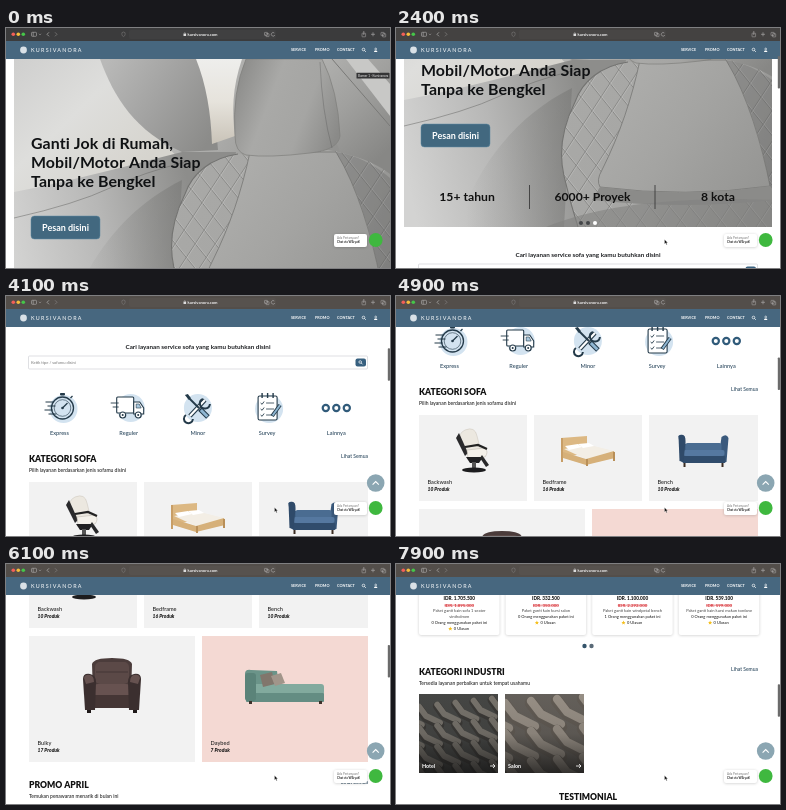
An HTML page with a canvas for the animation above (8 s loop, 384x240 px).

```html
<!DOCTYPE html>
<html lang="id">
<head>
<meta charset="utf-8">
<title>Kursivanora</title>
<style>
html, body { margin: 0; width: 100%; height: 100%; overflow: hidden; background: #fff; }
canvas { display: block; width: 384px; height: 240px; }
</style>
</head>
<body>
<canvas id="stage"></canvas>
<script>
const W = 384, H = 240, LOOP = 8000, STEP = 100;
const cv = document.getElementById('stage');
const dpr = Math.max(1, window.devicePixelRatio || 1);
cv.width = W * dpr;
cv.height = H * dpr;
const g = cv.getContext('2d');
const BLUE = '#47677f', INK = '#1b1d20', NAVY = '#29465c', LINE = '#243a49';

// ---- drawing helpers ----
function rect(x, y, w, h, fill, r = 0) {
  g.beginPath();
  g.roundRect(x, y, w, h, r);
  g.fillStyle = fill;
  g.fill();
}
function frame(x, y, w, h, color, lw = 0.6, r = 0) {
  g.beginPath();
  g.roundRect(x, y, w, h, r);
  g.strokeStyle = color;
  g.lineWidth = lw;
  g.stroke();
}
function disc(x, y, r, fill) {
  g.beginPath();
  g.arc(x, y, r, 0, 7);
  g.fillStyle = fill;
  g.fill();
}
function ring(x, y, r, color, lw) {
  g.beginPath();
  g.arc(x, y, r, 0, 7);
  g.strokeStyle = color;
  g.lineWidth = lw;
  g.stroke();
}
function line(color, lw, ...p) {
  g.beginPath();
  for (let i = 0; i < p.length; i += 2) g.lineTo(p[i], p[i + 1]);
  g.strokeStyle = color;
  g.lineWidth = lw;
  g.stroke();
}
function poly(fill, ...p) {
  g.beginPath();
  for (let i = 0; i < p.length; i += 2) g.lineTo(p[i], p[i + 1]);
  g.closePath();
  g.fillStyle = fill;
  g.fill();
}
function shape(d, fill, stroke, lw = 1) {
  const p = new Path2D(d);
  if (fill) { g.fillStyle = fill; g.fill(p); }
  if (stroke) { g.strokeStyle = stroke; g.lineWidth = lw; g.stroke(p); }
  return p;
}
function fade(x0, y0, x1, y1, ...stops) {
  const f = g.createLinearGradient(x0, y0, x1, y1);
  stops.forEach((c, i) => f.addColorStop(i / (stops.length - 1), c));
  return f;
}
function shadow(color, blur, dy = 0) {
  g.shadowColor = color;
  g.shadowBlur = blur * dpr;
  g.shadowOffsetY = dy * dpr;
}
function noShadow() { shadow('transparent', 0); }

// y is the middle of the capitals
function text(s, x, y, size, color = INK, style = '400', align = 'left', gap = 0) {
  g.font = `${style} ${size}px Lato, "Open Sans", sans-serif`;
  g.textAlign = align;
  g.letterSpacing = gap + 'px';
  g.fillStyle = color;
  g.fillText(s, x, y + size * 0.36);
}
function glass(x, y, color, r = 1.3) {
  ring(x, y, r, color, 0.7);
  line(color, 0.8, x + r * 0.7, y + r * 0.7, x + r * 1.8, y + r * 1.8);
}
function at(x, y, draw) {
  g.save();
  g.translate(x, y);
  draw();
  g.restore();
}

// ---- motion ----
const KEYS = [[0, 0], [1200, 0], [2400, 92], [4100, 268], [4900, 335], [6100, 476], [7100, 692], [7900, 761]];
const slope = i => (KEYS[i + 1][1] - KEYS[i][1]) / (KEYS[i + 1][0] - KEYS[i][0]);
function tangent(i) {
  if (i === 0) return 0;
  if (i === KEYS.length - 1) return slope(i - 1) * 0.6;
  const a = slope(i - 1), b = slope(i);
  return a * b <= 0 ? 0 : 2 * a * b / (a + b);
}
function scrollAt(t) {
  let i = 0;
  while (i < KEYS.length - 2 && t > KEYS[i + 1][0]) i++;
  const [t0, y0] = KEYS[i], [t1, y1] = KEYS[i + 1], d = t1 - t0;
  const u = Math.min(1, (t - t0) / d), v = 1 - u;
  return y0 * (1 + 2 * u) * v * v + tangent(i) * d * u * v * v
    + y1 * u * u * (3 - 2 * u) - tangent(i + 1) * d * u * u * v;
}
function intro(t) {
  const u = Math.min(1, Math.max(0, (t - 700) / 600));
  return u * u * (3 - 2 * u);
}

// ---- hero ----
function quilt(path, gap) {
  g.save();
  g.clip(path);
  for (let k = -300; k < 700; k += gap) {
    for (const [dx, c] of [[0, 'rgba(90,90,88,.5)'], [1, 'rgba(215,215,213,.4)']]) {
      line(c, 0.8, k + dx, 291, k + dx + 170, 31);
      line(c, 0.8, k + dx, 31, k + dx + 210, 291);
    }
  }
  g.restore();
}
function seatPhoto(right) {
  g.save();
  g.beginPath();
  g.rect(8, 31, right - 8, 260);
  g.clip();
  rect(8, 31, 376, 260, fade(8, 31, 384, 240, '#d9d9d8', '#c2c2c0', '#959593', '#8a8a88'));
  // windows and pillar
  poly(fade(8, 31, 120, 150, '#cfcfce', '#dededc', '#d6d4ce'), 8, 31, 100, 31, 130, 90, 175, 132, 8, 165);
  shape('M94 31 C108 70 130 104 176 124 L212 122 L204 31 Z', fade(96, 40, 205, 110, '#b9b9b8', '#a2a2a1', '#8b8b89'));
  shape('M190 31 H236 C226 60 226 84 229 108 L206 116 C205 84 200 56 190 31 Z', fade(0, 31, 0, 116, '#eeeeec', '#e6e3dc', '#c9c3b8'));
  shape('M300 31 H384 V160 L334 124 Z', fade(300, 31, 384, 120, '#b4b4b2', '#a0a09e', '#878785'));
  poly('#c8c8c6', 340, 31, 362, 31, 384, 56, 384, 88);
  line('#797977', 1, 326, 31, 384, 98);
  // door
  shape('M8 164 C70 152 120 138 176 124 L230 124 L200 291 H8 Z', fade(8, 230, 190, 190, '#d3d3d2', '#b7b7b6', '#8d8d8b'));
  shape('M8 190 Q70 176 104 160 T180 134', null, 'rgba(110,110,108,.55)', 1);
  shape('M60 291 C84 226 120 180 176 152 L168 291 Z', fade(70, 0, 175, 0, 'rgba(130,130,128,0)', 'rgba(115,115,113,.5)'));
  // seat
  const edge = 'M232 126 C204 130 186 146 179 166 C168 188 162 214 168 240 Q174 266 182 291';
  const back = shape(edge + ' H384 V146 C366 132 344 126 322 122 Z',
    fade(164, 150, 384, 260, '#a9a9a7', '#a6a6a4', '#8c8c8a'));
  quilt(back, 20);
  shape(edge, null, '#737371', 1.1);
  shape('M244 124 L330 124 C352 160 366 210 374 250 Q290 262 204 251 Q200 244 206 234 C224 198 236 162 244 124 Z',
    fade(206, 130, 370, 250, '#b0b0ae', '#a4a4a2', '#959593'), '#7c7c7a', 0.9);
  shape('M204 251 Q290 262 374 250 L378 264 Q290 274 196 264 Z', '#8b8b89');
  shape('M374 250 C366 206 352 160 330 124 Q358 128 384 150 V262 Z', 'rgba(95,95,93,.3)');
  shape('M150 291 Q230 258 384 264 V291 Z', 'rgba(130,130,128,.6)');
  // headrest
  shape('M240 31 H316 Q332 62 334 108 Q332 122 304 125 Q262 130 240 127 Q229 124 229 108 Q226 64 240 31 Z',
    fade(228, 60, 334, 100, '#8d8d8b', '#a9a9a7', '#a5a5a3', '#8a8a88'), '#7e7e7c', 0.7);
  shape('M314 34 Q316 84 326 120', null, 'rgba(85,85,83,.5)', 0.7);
  g.restore();
}
function hero(t) {
  seatPhoto(W - 8 * intro(t));
  ['Ganti Jok di Rumah,', 'Mobil/Motor Anda Siap', 'Tanpa ke Bengkel']
    .forEach((s, i) => text(s, 25, 115 + i * 19, 15.9, '#101214', '700', 'left', 0.1));
  rect(25, 188, 69, 23, '#42687f', 3.5);
  frame(25, 188, 69, 23, '#5f8ba3', 0.5, 3.5);
  text('Pesan disini', 59.5, 199.3, 9, '#fff', '700', 'center');
  [['15+ tahun', 71], ['6000+ Proyek', 196.5], ['8 kota', 322]]
    .forEach(([s, x]) => text(s, x, 261, 12.2, '#111', '700', 'center'));
  for (const x of [133.5, 259]) line('#3c3c3c', 0.9, x, 249, x, 273);
  disc(185, 287, 2, '#444648');
  disc(192, 287, 2, '#444648');
  disc(199, 287, 2, '#fff');
}

// ---- services ----
function stopwatch() {
  disc(4, 2, 14, '#d3e3f0');
  ring(3, 1, 11, LINE, 1.3);
  ring(3, 1, 8.3, LINE, 0.6);
  line(LINE, 1.2, 3, 1, 8, -4);
  disc(3, 1, 1.3, LINE);
  rect(0.5, -14, 5, 2.4, LINE, 0.8);
  line(LINE, 1.2, 11, -9, 13, -11);
  [[-14, -5], [-12, -1], [-15, 3], [-11, 7]].forEach(([x, y]) => line(LINE, 1, x, y, x + 8, y));
}
function truck() {
  disc(2, 1, 14, '#d3e3f0');
  rect(-12, -10, 17, 16, '#fff', 1);
  frame(-12, -10, 17, 16, LINE, 1.1, 1);
  shape('M5 -5 H11 L15 1 V7 H5 Z', '#fff', LINE, 1.1);
  shape('M7.5 -3 H10.5 L12.5 1 H7.5 Z', '#a9c8de', LINE, 0.6);
  for (const x of [-6, 9.5]) { disc(x, 8, 3.2, '#fff'); ring(x, 8, 3, LINE, 1.2); disc(x, 8, 1, LINE); }
  line(LINE, 0.9, -18, -4, -10, -4);
  line(LINE, 0.9, -16, 0, -10, 0);
}
function tools() {
  disc(0, 1, 14, '#d3e3f0');
  line(LINE, 4.4, -8, 9, 7, -7);
  line('#fff', 2.2, -8, 9, 7, -7);
  shape('M5 -8 A5 5 0 1 0 12 -3', null, LINE, 2);
  shape('M-12 8 A4.5 4.5 0 1 0 -5 12', null, LINE, 2);
  line(LINE, 1.8, -10, -10, 1, 1);
  line(LINE, 5, 2, 2, 10, 10);
  line('#8fb6d2', 3, 3, 3, 9.5, 9.5);
  poly(LINE, -13, -12, -10, -13, -7, -9, -9, -7);
}
function clipboard() {
  disc(2, 2, 14, '#d3e3f0');
  rect(-9, -11, 19, 24, '#fff', 1.5);
  frame(-9, -11, 19, 24, LINE, 1.1, 1.5);
  for (const x of [-5, 0.5, 6]) line(LINE, 1.4, x, -14, x, -9);
  for (const y of [-4, 2, 8]) {
    line(LINE, 0.9, -6.5, y, -5, y + 1.3, -3, y - 1.5);
    line(LINE, 0.8, -1, y, 7, y);
  }
  line(LINE, 3.8, 5, 9, 13, -2);
  line('#8fb6d2', 2, 5.5, 8.5, 13, -2);
}
function dots() {
  for (const x of [-10.5, 0, 10.5]) ring(x, 1, 3.1, '#315b7a', 2.2);
}
function services() {
  text('Cari layanan service sofa yang kamu butuhkan disini', 192, 319, 6.3, INK, '700', 'center');
  rect(22.5, 328, 339, 13, '#fff', 1);
  frame(22.5, 328, 339, 13, '#c9ccd0', 0.6, 1);
  text('Ketik tipe / sofamu disini', 25, 334.5, 4.1, '#777');
  rect(349.5, 330.5, 10.5, 8, '#37607f', 2);
  glass(354.2, 334, '#fff');
  [['Express', stopwatch], ['Reguler', truck], ['Minor', tools], ['Survey', clipboard], ['Lainnya', dots]]
    .forEach(([name, icon], i) => {
      const x = 53.5 + i * 69.2;
      at(x, 379, icon);
      text(name, x, 405, 5.6, NAVY, '500', 'center');
    });
}

// ---- furniture ----
function salonChair() {
  shape('M-12 -8 Q-16 -16 -8 -20 Q2 -24 4 -14 L8 2 L-6 4 Z', '#ece8e0', '#c8c2b8', 0.5);
  shape('M-14 -17 L-5 3 L-8 6 L-17 -12 Z', '#2a2a2c');
  shape('M-6 0 L12 -2 Q16 2 12 7 L-5 8 Z', '#f4f1ea', '#bbb5aa', 0.5);
  line('#222', 2.2, -8, -3, 5, -5, 14, -1);
  poly('#202022', -7, 7, 10, 7, 6, 13, -3, 13);
  poly('#28282a', 9, 5, 16, 15, 13, 17, 7, 8);
  rect(-1, 12, 4, 7, '#555');
  g.beginPath();
  g.ellipse(1, 20, 12, 2.4, 0, 0, 7);
  g.fillStyle = '#1d1d1f';
  g.fill();
}
function bed() {
  poly('#dcb883', -27, -12, -1, -14, -1, 3, -27, 8);
  poly('#c89e66', -27, -12, -25, -12, -25, 12, -27, 12);
  poly('#f3eee5', -24, -1, 2, -5, 26, 1, -2, 9);
  poly('#fff', -23, -4, -10, -6, -6, -3, -19, 0);
  poly('#fff', -10, -6, 1, -7, 6, -4, -5, -2);
  poly('#d6b079', -25, 2, -2, 9, 26, 1, 27, 8, -2, 15, -25, 8);
  poly('#b98f58', -2, 9, 0, 9, 0, 16, -2, 16);
  poly('#b98f58', 25, 2, 27, 2, 27, 11, 25, 11);
}
function blueBench() {
  shape('M-25 -14 Q-22 -17 -19 -13 L-18 -6 H17 L18 -13 Q23 -17 25 -12 L23 12 H-22 Z', '#3b5a7d');
  rect(-18, -7, 36, 10, '#4a6c91', 2);
  rect(-20, 0, 41, 6, '#5578a0', 2);
  rect(-21, 6, 43, 7, '#304c6c', 1);
  shape('M-25 -14 Q-18 -18 -18 -9 L-20 12 L-24 11 Z', '#2f4a69');
  for (const x of [-20, 18]) rect(x, 13, 2, 4, '#3a2c22');
}
function armchair() {
  shape('M-20 -22 Q-18 -28 0 -28 Q18 -28 20 -22 L19 8 H-19 Z', '#4b3c3b');
  rect(-17, -24, 34, 22, '#5b4947', 5);
  line('#3d3030', 0.8, -16, -14, 16, -14);
  rect(-18, -2, 36, 13, '#675250', 4);
  rect(-20, 9, 40, 13, '#453635', 2);
  for (const m of [-1, 1]) {
    g.save();
    g.scale(m, 1);
    shape('M-29 -7 Q-29 -13 -22 -12 Q-16 -11 -16 -4 L-17 24 H-27 Z', '#3b2f2f');
    shape('M-28 -8 Q-27 -12 -22 -11 Q-18 -10 -18 -4 L-26 -2 Z', '#665250');
    rect(-25, 24, 4, 3, '#1f1919');
    g.restore();
  }
}
function daybed() {
  shape('M-40 -12 Q-40 -17 -34 -16 L-8 -15 L-6 0 H-38 Z', '#6b9489');
  rect(-40, -2, 79, 11, '#82aa9e', 3);
  rect(-39, 7, 78, 9, '#648d83', 1);
  rect(-40, -13, 11, 28, '#5b8379', 3);
  poly('#81766c', -25, -11, -13, -14, -10, -2, -22, 1);
  poly('#a1958a', -14, -10, -4, -13, 0, -3, -10, 0);
  for (const x of [-36, 34]) rect(x, 15, 3, 3, '#3d322b');
}
function darkSofa() {
  shape('M-19 -17 L16 -19 Q20 -19 20 -14 V4 H-17 Z', '#3a3c3f');
  for (let x = -12; x < 18; x += 8.6) for (const y of [-13, -7]) disc(x, y, 0.7, '#222426');
  shape('M-17 -1 L12 -3 L19 2 L18 9 H-14 Z', '#4a4c50');
  shape('M-24 -8 Q-24 -11 -20 -11 Q-15 -11 -15 -7 L-13 19 H-21 Z', '#303235');
  shape('M13 -7 Q14 -10 19 -10 Q24 -9 24 -5 L23 17 H14 Z', '#34363a');
  poly('#3d3f43', -14, 7, 15, 6, 15, 16, -13, 18);
  for (const x of [-19, 17]) rect(x, 17, 2, 5, '#1b1b1c');
}
function stool() {
  shape('M-13 -20 Q-12 -25 0 -25 Q12 -25 12 -20 Q12 -14 0 -14 Q-13 -14 -13 -20 Z', '#e6e0d4');
  shape('M-13 -19 Q0 -14 12 -19', null, '#a8a298', 0.6);
  rect(-1.5, -14, 3, 23, '#8f9193');
  rect(-2.4, -4, 4.8, 9, '#57595b');
  line('#77797b', 2, -11, 16, 0, 8, 12, 15);
  line('#77797b', 2, -5, 20, 0, 8, 7, 20);
  for (const [x, y] of [[-12, 17], [12, 16], [-5, 21], [8, 21]]) disc(x, y, 1.6, '#2c2c2d');
}
function longBench() {
  shape('M-24 -11 Q-20 -13 -17 -9 Q0 -6 17 -9 Q20 -13 24 -11 L22 3 H-22 Z', '#323437');
  for (let x = -17; x < 20; x += 5.7) disc(x, -3, 0.5, '#5d5f62');
  rect(-22, 2, 44, 3, '#232527');
  for (const m of [-1, 1]) {
    line('#3a2e27', 1.8, 20 * m, 4, 18.5 * m, 12, 21 * m, 22);
    line('#4a3b32', 1.3, 14 * m, 4, 15 * m, 17);
  }
}
function diningChair() {
  shape('M-6 -25 H12 L13 6 H-8 Z', '#262223');
  line('#3f3939', 0.6, 3, -24, 3, 3);
  poly('#332d2d', -13, 5, -8, 1, 12, 3, 12, 10, -12, 10);
  line('#1d1919', 2, -11, 9, -12, 24);
  line('#1d1919', 2, 11, 9, 13, 24);
  line('#1d1919', 1.6, 3, 9, 3, 20);
}

// ---- sections ----
function heading(title, sub, y, linkY) {
  text(title, 23, y, 8.6, '#111', '900');
  text(sub, 23, y + 11.5, 5, '#222', '500');
  text('Lihat Semua', 362, linkY, 5, NAVY, '500', 'right');
}
function sofaCard(x, y, w, h, fill, name, count, draw) {
  rect(x, y, w, h, fill);
  at(x + w / 2, y + (h > 100 ? 50 : 35), draw);
  text(name, x + 8.5, y + h - 19.5, 5.6, '#222', '500');
  text(count + ' Produk', x + 8.5, y + h - 12, 5, '#111', 'italic 800');
}
function sofas() {
  heading('KATEGORI SOFA', 'Pilih layanan berdasarkan jenis sofamu disini', 430.5, 428.5);
  const grey = '#f2f2f2';
  sofaCard(23, 454, 108, 86, grey, 'Backwash', 10, salonChair);
  sofaCard(138, 454, 108, 86, grey, 'Bedframe', 16, bed);
  sofaCard(253, 454, 109, 86, grey, 'Bench', 10, blueBench);
  sofaCard(23, 548, 166, 126, grey, 'Bulky', 17, armchair);
  sofaCard(196, 548, 166, 126, '#f4d9d3', 'Daybed', 7, daybed);
}
const GOODS = [
  ['Vintholmen Sofa 1 Seater', '1.705.500', '1.895.000', ['Paket ganti kain sofa 1 seater', 'vintholmen'], 0, darkSofa],
  ['Kursi Salon Melvar', '332.500', '350.000', ['Paket ganti kain kursi salon'], 0, stool],
  ['Windpetal Bench', '1.100.000', '2.292.000', ['Paket ganti kain windpetal bench'], 1, longBench],
  ['Kursi Makan Tordane', '539.100', '599.000', ['Paket ganti kain kursi makan tordane'], 0, diningChair]
];
function star(x, y, r) {
  const p = [];
  for (let i = 0; i < 10; i++) {
    const a = -Math.PI / 2 + i * Math.PI / 5, q = i % 2 ? r * 0.45 : r;
    p.push(x + q * Math.cos(a), y + q * Math.sin(a));
  }
  poly('#f5bf1c', ...p);
}
function promo() {
  heading('PROMO APRIL', 'Temukan penawaran menarik di bulan ini', 696.5, 694.5);
  GOODS.forEach(([name, price, old, desc, used, draw], i) => {
    const x = 23 + i * 86.6, c = x + 40.3;
    shadow('rgba(0,0,0,.2)', 3, 0.6);
    rect(x, 719, 80.5, 113, '#fff', 2);
    noShadow();
    rect(x + 4, 722, 72.5, 60, '#f1f1f1', 1);
    at(c + 1, 754, draw);
    text(name, c, 789, 4.8, NAVY, '700', 'center');
    text('IDR. ' + price, c, 795.5, 4.7, '#111', '800', 'center');
    text('IDR. ' + old, c, 802, 4.4, '#d8343a', '700', 'center');
    const w = g.measureText('IDR. ' + old).width / 2;
    line('#d8343a', 0.6, c - w, 802.2, c + w, 802.2);
    let y = 808;
    for (const s of desc) { text(s, c, y, 4.1, '#444', '400', 'center'); y += 6; }
    text(used + ' Orang menggunakan paket ini', c, y, 4, '#222', '500', 'center');
    star(c - 9, y + 5.8, 2.2);
    text('0 Ulasan', c - 5.5, y + 6, 4, '#222', '500');
  });
  disc(188.5, 843, 2.2, '#34536a');
  disc(195.5, 843, 2.2, '#596a77');
}
// one row of reclining seats, drawn back to front
function tile(x, name, wall, seat, edge, size) {
  g.save();
  g.beginPath();
  g.rect(x, 891, 79, 79);
  g.clip();
  rect(x, 891, 79, 79, wall);
  g.lineCap = g.lineJoin = 'round';
  for (let y = 912; y < 990; y += size * 1.5) {
    for (let k = 4; k >= -1; k--) {
      const a = x + k * size * 1.3, b = y - k * 2;
      line(edge, size * 0.62, a, b - size * 0.5, a + size * 0.5, b + 3, a + size * 1.5, b + size * 0.7);
      line(seat, size * 0.42, a, b - size * 0.6, a + size * 0.5, b + 1, a + size * 1.5, b + size * 0.55);
    }
  }
  rect(x, 891, 79, 79, fade(0, 891, 0, 970, 'rgba(20,20,20,.1)', 'rgba(20,20,20,.2)', 'rgba(15,15,15,.75)'));
  g.restore();
  text(name, x + 3, 963, 5.4, '#fff', '700');
  line('#fff', 0.8, x + 71, 963, x + 76, 963);
  line('#fff', 0.8, x + 74, 961, x + 76, 963, x + 74, 965);
}
function industries() {
  heading('KATEGORI INDUSTRI', 'Tersedia layanan perbaikan untuk tempat usahamu', 868.5, 866);
  tile(23, 'Hotel', '#4b4c4a', '#827d75', '#3f3d3a', 14);
  tile(109, 'Salon', '#6d6862', '#a69d92', '#6a635b', 20);
  text('TESTIMONIAL', 192, 993.5, 8.6, '#111', '900', 'center');
}

// ---- fixed parts ----
// the bar takes on a warm tint as the page passes beneath it
function browserBar(y) {
  const k = Math.min(1, y / 250);
  rect(0, 0, W, 13, `rgb(${59 + 24 * k},${59 + 19 * k},${60 + 14 * k})`);
  ['#f35f57', '#f6bd3b', '#45c649'].forEach((c, i) => disc(7.3 + i * 5, 6.3, 1.8, c));
  const c = '#b4b3b2', dim = '#858382';
  frame(25.5, 4.3, 5, 4, c, 0.6, 0.8);
  line(c, 0.6, 27.2, 4.3, 27.2, 8.3);
  line(c, 0.6, 33, 5.8, 34, 6.8, 35, 5.8);
  line(c, 0.7, 43, 4.3, 41, 6.3, 43, 8.3);
  line(dim, 0.7, 49, 4.3, 51, 6.3, 49, 8.3);
  shape('M117.5 4 L119.1 4.7 V6.5 Q119.1 7.8 117.5 8.6 Q115.9 7.8 115.9 6.5 V4.7 Z', null, dim, 0.5);
  rect(123, 2, 147, 9, 'rgba(255,255,255,.025)', 2);
  rect(177.5, 5.7, 2.6, 2.3, '#ddd', 0.3);
  ring(178.8, 5.5, 0.8, '#ddd', 0.4);
  text('kursivanora.com', 181.5, 6.5, 4.1, '#f2f2f2', '700');
  frame(258.5, 4.4, 3, 3, c, 0.5, 0.4);
  frame(260, 5.6, 3, 3, c, 0.5, 0.4);
  shape('M268.3 5 A1.8 1.8 0 1 0 268.8 7', null, c, 0.6);
  frame(356, 5.2, 3.6, 3.6, c, 0.5, 0.4);
  line(c, 0.6, 357.8, 7, 357.8, 3);
  line(c, 0.6, 365, 6.3, 369, 6.3);
  line(c, 0.6, 367, 4.3, 367, 8.3);
  frame(375, 4.4, 3.2, 3.2, c, 0.5, 0.4);
  frame(376.5, 5.7, 3.2, 3.2, c, 0.5, 0.4);
}
function navBar() {
  rect(0, 13, W, 18, BLUE);
  disc(17.5, 22, 3.4, '#d9e1e7');
  text('KURSIVANORA', 25, 22, 5.4, '#f2f5f7', '500', 'left', 1.25);
  [['SERVICE', 285], ['PROMO', 309], ['CONTACT', 331]].forEach(([s, x]) => text(s, x, 22, 3.8, '#fff', '700'));
  glass(357.5, 21.5, '#fff');
  ring(369.7, 21, 0.9, '#fff', 0.6);
  shape('M368 24 Q368 22.6 369.7 22.6 Q371.4 22.6 371.4 24 Z', '#fff');
}
function widgets(y) {
  if (y > 190) {
    disc(369.7, 187, 8.8, '#8ba6b2');
    line('#fff', 1.1, 366.6, 188.6, 369.7, 185.5, 372.8, 188.6);
  }
  shadow('rgba(0,0,0,.2)', 3, 0.6);
  rect(328, 206, 33, 13, '#fff', 2);
  noShadow();
  disc(369.7, 212, 6.9, '#3fb83f');
  text('Ada Pertanyaan?', 331, 210.2, 3, '#777');
  text('Chat via WA yuk!', 331, 214.4, 3, '#222', '700');
}
function pointer(t) {
  const e = intro(t);
  at(352 - 83.5 * e, 40 + 171.5 * e, () => {
    shape('M0 0 V4.6 L1.1 3.6 L1.9 5.3 L2.7 4.9 L1.9 3.3 H3.3 Z', '#111', '#fff', 0.3);
  });
}

function draw(t) {
  const y = scrollAt(t);
  g.setTransform(dpr, 0, 0, dpr, 0, 0);
  rect(0, 0, W, H, '#fff');
  at(0, -y, () => [hero, services, sofas, promo, industries].forEach(part => part(t)));
  navBar();
  widgets(y);
  if (y > 0) rect(381.8, 15.3 + y * 0.138, 2.2, 32.5, '#6b6b6b', 0.8);
  browserBar(y);
  if (t < 700) {
    rect(350.5, 44.8, 33, 5.8, '#353536', 0.6);
    text('Banner 1 - Kursivanora', 352, 47.7, 3, '#f0f0f0');
  } else pointer(t);
}

const start = performance.now();
function tick() {
  const t = (performance.now() - start) % LOOP;
  draw(Math.floor(t / STEP) * STEP);
  requestAnimationFrame(tick);
}
tick();
</script>
</body>
</html>
```
